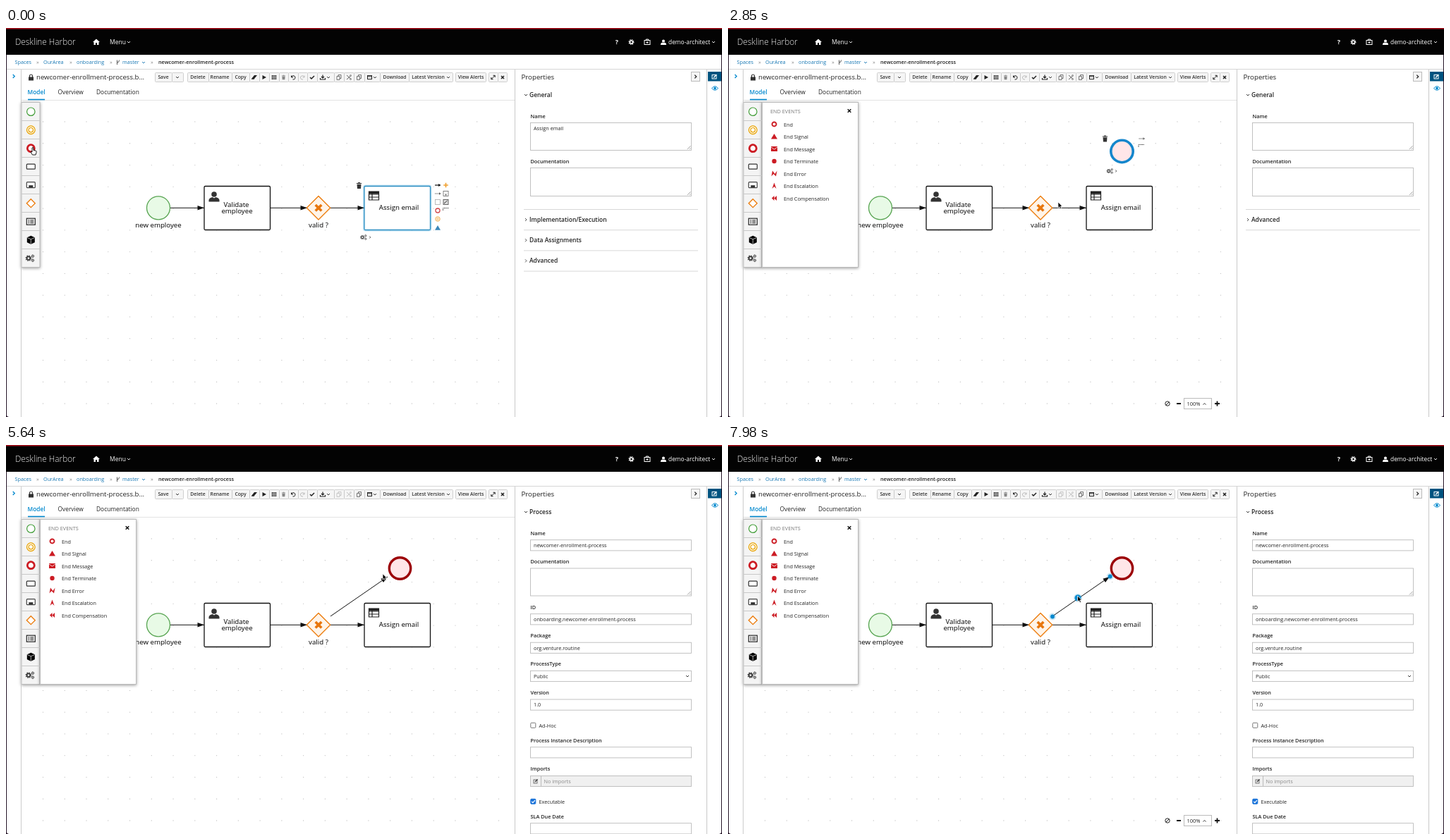
These frames come from a looping animation (1015x552 px, 8000 ms). An HTML page:

```html
<!DOCTYPE html>
<html lang="en">
<head>
<meta charset="utf-8">
<title>Process editor</title>
<style>
html, body { margin: 0; width: 100%; height: 100%; overflow: hidden; background: #fff; }
svg { display: block; width: 1015px; height: 552px; font-family: "Open Sans", "Noto Sans", sans-serif; }
text { white-space: pre; }
</style>
</head>
<body>
<svg id="stage" viewBox="0 0 1015 552"></svg>
<script>
const BLUE = '#0088ce', RED = '#cc1c24', ORANGE = '#ec7a08', INK = '#222', GREY = '#bbb';
const PROCESS = 'newcomer-enrollment-process';

// Drawing helpers; text is given by the middle of its capitals
const text = (x, y, s, size = 7.25, fill = INK, weight = 400, anchor = 'start') =>
  `<text x="${x}" y="${y + size * 0.36}" font-size="${size}" fill="${fill}" font-weight="${weight}" text-anchor="${anchor}">${s}</text>`;
const rect = (x, y, w, h, fill = 'none', stroke = 'none', more = '') =>
  `<rect x="${x}" y="${y}" width="${w}" height="${h}" fill="${fill}" stroke="${stroke}" ${more}/>`;
const path = (d, stroke = INK, width = 1, fill = 'none', more = '') =>
  `<path d="${d}" stroke="${stroke}" stroke-width="${width}" fill="${fill}" ${more}/>`;
const shape = (d, fill = INK) => path(d, 'none', 0, fill);
const circle = (x, y, r, fill = 'none', stroke = 'none', width = 1, more = '') =>
  `<circle cx="${x}" cy="${y}" r="${r}" fill="${fill}" stroke="${stroke}" stroke-width="${width}" ${more}/>`;
const at = (x, y, body, k = 1) => `<g transform="translate(${x} ${y}) scale(${k})">${body}</g>`;
const group = (id, body) => `<g id="${id}">${body}</g>`;
const down = (x, y, c = INK) => path(`M${x - 2} ${y - 1}l2 2l2-2`, c, 0.9);
const right = (x, y, c = INK, k = 2) => path(`M${x - k / 2} ${y - k}l${k} ${k}l${-k} ${k}`, c, k > 2 ? 1.3 : 0.8);

const gear = c => circle(0, 0, 2.1, 'none', c, 1.5) + circle(0, 0, 3.4, 'none', c, 1.2, 'stroke-dasharray="1.4 1.27"');
const gears = c => at(-2, 0, gear(c), 0.9) + at(3, -2.5, gear(c), 0.5) + at(3, 2.5, gear(c), 0.5);
const trash = (c = '#333') => shape('M-4-4H-1.5V-5H1.5V-4H4V-2.7H-4zM-3.3-2H3.3L2.8 5H-2.8z', c);
const person = (c = '#333') => circle(0, -3, 3.8, c) + shape('M-7.5 7.5V5Q-7 2-2.3 1L0 2.5L2.3 1Q7 2 7.5 5V7.5z', c);
const cross = (c, k, w) => path(`M${-k} ${-k}L${k} ${k}M${k} ${-k}L${-k} ${k}`, c, w);
const tableIcon = () => path('M-7-6H7V6H-7zM-7-2.2H7M-7 2H7M-2.5-6V6', '#222', 1.2) + rect(-7, -6, 14, 3, '#222');
const pencil = c => path('M-2.5 2.5L2.5-2.5', c, 2) + shape('M-4 4L-3.3 1.2L-1.2 3.3z', c);
const copyIcon = c => path('M-3-1.5H1V3.5H-3zM-1-1.5V-3.5H3V1.5H1', c, 0.8);

const tools = {
  flow: () => path('M-4 0H2', '#111', 1.2) + shape('M1-2L4.5 0L1 2z', '#111'),
  dots: () => path('M-4 0H2', '#555', 1, 'none', 'stroke-dasharray="1.3 .8"') + shape('M2-1.7L4.5 0L2 1.7z', '#555'),
  plus: () => path('M-3.3 0H3.3M0-3.3V3.3', '#f0a030', 1.7),
  box: () => rect(-3.5, -3.5, 7, 7, '#fff', '#aaa', 'stroke-width=".8"'),
  sub: () => rect(-3.5, -3.5, 7, 7, '#fff', '#666', 'stroke-width=".8"') + rect(-1, 0.5, 2, 2, '#666'),
  diag: () => rect(-3.5, -3.5, 7, 7, '#ddd', '#555', 'stroke-width=".9"') + path('M-2.5 2L2-2', '#333'),
  end: () => circle(0, 0, 3, '#fff', '#d04045', 1.3),
  mid: () => circle(0, 0, 3.2, '#fff', '#f0a030', 0.9) + circle(0, 0, 1.3, 'none', '#f0a030', 0.7),
  tri: () => shape('M-4 3.3L0-3.5L4 3.3z', '#3b87b8'),
  note: () => path('M-4 2V-1.5H4', '#555', 0.9, 'none', 'stroke-dasharray="2 .5"')
};
const toolbox = list => list.map(([k, x, y]) => at(x, y, tools[k]())).join('');

function header() {
  const links = [[12.5, 'Spaces'], [53, 'OurArea'], [100, 'onboarding'], [165, 'master']];
  return rect(0, 0, 1015, 38, '#030303') + rect(0, 0, 1015, 1.6, '#a3101c') +
    text(13, 20, 'Deskline Harbor', 11.8, '#eee', 300) +
    at(128, 20, shape('M-5 0L0-4.5L5 0H3.5V4H1V1H-1V4H-3.5V0z', '#fff')) +
    text(147, 20, 'Menu', 8.5, '#fff') + down(174, 20, '#fff') +
    text(866, 20, '?', 9, '#fff', 700, 'middle') + at(886.5, 20, gear('#fff')) +
    at(909, 20, rect(-4, -2.5, 8, 6, 'none', '#fff') + path('M-1.7-2.5V-4H1.7V-2.5M0-1V2M-1.5 .5H1.5', '#fff')) +
    at(932, 20, person('#fff'), 0.53) + text(939, 20, 'demo-architect', 8.4, '#fff') + down(1003, 20, '#fff') +
    links.map(([x, s]) => text(x, 48.5, s, 7.25, '#1878b4')).join('') +
    [43, 90, 147, 205].map(x => text(x, 48, '»', 7.5, '#888')).join('') +
    path('M157.5 45.5V52M160.5 45.5Q160.5 49 157.5 49', '#444', 0.9) + down(195, 49, '#1878b4') +
    text(216, 48.5, PROCESS, 7.25, INK, 600) + path('M0 58.5H1015', '#d6d6d6');
}

function toolbar() {
  const box = (x, w) => rect(x + 0.5, 63.5, w, 13, '#f5f5f5', '#c4c4c4', 'rx="1" stroke-width=".8"');
  const cells = [[211, 24], [235, 16], [257, 30], [287, 33], [320, 25], [345, 14], [359, 14], [373, 14], [387, 13],
    [400, 14], [414, 13], [427, 14], [441, 24], [465, 14], [479, 14], [493, 15], [508, 22], [530, 41], [571, 62], [637, 43], [684, 13], [697, 13]];
  const labels = [[223, 'Save'], [272, 'Delete'], [303, 'Rename'], [332.5, 'Copy'], [551, 'Download'], [598.5, 'Latest Version'], [659, 'View Alerts']];
  const cut = c => path('M-3-3L2.5 2M-3 3L2.5-2', c, 0.9) + circle(2.5, 2.5, 1, 'none', c, 0.7) + circle(2.5, -2.5, 1, 'none', c, 0.7);
  const undo = c => path('M-2.5-2.5V0H0M-2.3-.3A2.7 2.7 0 1 1-.5 3', c);
  return at(35.5, 70, rect(-3.5, -0.5, 7, 5, '#333') + path('M-2 0V-2A2 2 0 0 1 2-2V0', '#333', 1.2)) +
    text(43, 69.5, PROCESS + '.b...', 9.6) + cells.map(c => box(...c)).join('') +
    labels.map(([x, s]) => text(x, 70, s, 6.8, '#333', 600, 'middle')).join('') +
    down(243, 70) + down(457, 70) + down(523, 70) + down(627, 70) +
    at(352, 70, shape('M-4 2L0-3H4L0 2zM-4 3H0V2.3H-4z')) + at(366, 70, shape('M-2.5-3L3 0L-2.5 3z')) +
    at(380, 70, rect(-3.3, -3, 6.6, 6, '#333') + path('M-3.5-1H3.5M-3.5 1H3.5M-1-3V3M1.2-3V3', '#eee', 0.6)) +
    at(393.5, 70, trash('#888'), 0.65) + at(407, 70, undo(INK)) + at(420.5, 70, `<g transform="scale(-1 1)">${undo(GREY)}</g>`) +
    at(434, 70, path('M-3 0L-1 2L3-2', INK, 1.5)) +
    at(449, 70, path('M0-3.5V1M-2-1L0 1L2-1M-3.5 1V3H3.5V1', INK, 1.2)) +
    group('editOn', at(472, 70, copyIcon('#555')) + at(486, 70, cut('#555'))) +
    group('editOff', at(472, 70, copyIcon(GREY)) + at(486, 70, cut(GREY))) + at(500.5, 70, copyIcon('#555')) +
    at(515.5, 70, rect(-3, -2.5, 6, 5, '#fff', INK) + path('M-3-1H3', INK)) +
    at(690.5, 70, path('M-2.5 2.5L2.5-2.5M0-2.7H2.7V0M-2.7 0V2.7H0', INK, 1)) + at(704, 70, cross(INK, 2, 1.5)) +
    text(30.5, 91, 'Model', 8.3, BLUE, 600) + text(73.5, 91, 'Overview', 8.4) + text(128, 91, 'Documentation', 8.4) +
    path('M22 102.5H721', '#e4e4e4') + path('M31 101.5H55', BLUE, 1.6);
}

function arrow(x1, y1, x2, y2, color = '#111') {
  const a = Math.atan2(y2 - y1, x2 - x1) * 180 / Math.PI;
  return path(`M${x1} ${y1}L${x2} ${y2}`, color) +
    `<g transform="translate(${x2} ${y2}) rotate(${a})">${shape('M0 0L-9.5-3.2V3.2z', '#111')}</g>`;
}

function diagram() {
  let dots = '';
  for (let i = 0; i < 22; i++)
    for (let j = 0; j < 14; j++) dots += circle(52.5 + 30.76 * i, 133 + 30.77 * j, 0.65, '#c4c4c4');
  const task = (x, stroke, w) => rect(x, 224.5, 93.5, 62, '#fff', stroke, `stroke-width="${w}" rx="1.5"`);
  const gate = (stroke, fill) => path('M443 238.5L459.7 255.3L443 272L426.3 255.3z', stroke, 1.3, fill, 'stroke-linejoin="round"');
  return dots + arrow(233, 255.3, 281, 255.3) + arrow(375, 255.3, 427, 255.3) + arrow(460, 255.3, 508, 255.3) +
    circle(216, 255.3, 16.5, '#e8fae6', '#58a552', 1.3) + text(216, 279.3, 'new employee', 9.7, '#000', 400, 'middle') +
    task(281, '#111', 1.3) + at(295, 239, person()) +
    text(326.5, 250.3, 'Validate', 9.7, '#000', 400, 'middle') + text(327.5, 259.3, 'employee', 9.7, '#000', 400, 'middle') +
    group('gatePlain', gate(ORANGE, '#fff4e8')) +
    group('gateSel', path('M443 238.5L459.7 255.3L443 272L426.3 255.3z', BLUE, 4, 'none', 'opacity=".25"') + gate('#2a8abf', '#fff') +
      at(418.5, 237, trash(), 0.9) + at(425, 283, gears('#444'), 0.9) + rect(464, 231, 12.5, 12, '#fff', '#426', 'stroke-width=".9"') +
      toolbox([['flow', 470, 237], ['end', 482, 237], ['plus', 494, 237], ['note', 507, 236], ['dots', 470, 249], ['mid', 482, 249],
        ['sub', 494, 249], ['box', 470, 261], ['tri', 482, 261], ['diag', 494, 261]])) +
    at(443, 255.3, cross('#e8770d', 4.3, 3.6)) + text(443, 279.3, 'valid ?', 9.7, '#000', 400, 'middle') +
    group('taskPlain', task(508, '#111', 1.3)) +
    group('taskSel', rect(508, 224.5, 93.5, 62, 'none', BLUE, 'stroke-width="4" rx="2" opacity=".25"') + task(508, '#2d8fc2', 1.3) +
      at(500.5, 223.5, trash(), 0.9) + at(507, 297, gears('#444'), 0.9) + right(516, 297, INK, 1.5) +
      toolbox([['flow', 612, 223], ['plus', 623.5, 223], ['dots', 612, 235], ['sub', 623.5, 235], ['box', 612, 247], ['diag', 623.5, 247],
        ['end', 612, 259], ['note', 623.5, 257], ['mid', 612, 271], ['tri', 612, 283.5]])) +
    at(521.5, 238, tableIcon()) + text(557, 255, 'Assign email', 9.7, '#000', 400, 'middle') +
    group('endSel', circle(558.5, 175, 15.7, '#ffe6e8', '#1486cc', 3.6)) +
    group('endTools', at(534.5, 157, trash(), 0.9) + at(541.5, 203, gears('#444'), 0.9) + right(550, 203, INK, 1.5) +
      toolbox([['dots', 586.5, 157], ['note', 586, 167]])) +
    group('endPlain', circle(558.5, 175, 15.2, '#ffe6e8', '#9c0006', 3.4)) +
    group('magnets', circle(558.5, 175, 15.7, 'none', '#2f66cf', 3.6) +
      [[558.5, 158], [575.5, 175], [558.5, 192], [541.5, 175], [558.5, 175]].map(p => circle(...p, 4, '#1c86cb')).join('')) +
    group('flowBlack', arrow(460, 243, 541, 187)) +
    group('flowBlue', path('M460 243L541 187', BLUE, 4, 'none', 'opacity=".2"') + arrow(460, 243, 541, 187, '#1c86cb')) +
    group('handles', [[460, 243.5], [541.7, 186.5]].map(p => circle(...p, 5, BLUE, 'none', 1, 'opacity=".2"') + circle(...p, 2.9, BLUE)).join('')) +
    group('midOpen', circle(497, 217.7, 3.8, '#fff', BLUE, 1.5)) +
    group('midFull', circle(496, 217, 6, BLUE, 'none', 1, 'opacity=".2"') + circle(496, 217, 4.5, BLUE)) +
    group('drag', '<path id="dragLine" stroke="#1c86cb" fill="none"/>' + circle(460, 241.5, 3.6, '#b0102c') +
      `<g id="dragRing">${circle(0, 0, 12, 'none', '#000', 2)}</g>`) +
    group('zoom', circle(623, 533, 3.2, 'none', '#222', 1) + path('M621 535L625 531') + path('M636 533H642M690 533H697M693.5 529.5V536.5', '#111', 1.8) +
      rect(646.5, 525.5, 39, 15, '#fff', '#bbb') + text(650.5, 533.5, '100%', 7.5) + path('M673.5 534.5l2-2l2 2', INK, 0.9)) +
    group('newEnd', circle(0, 0, 7.5, '#fde', 'none') + circle(0, 0, 5.2, '#fff', '#cf2026', 3.3));
}

function palette() {
  const icons = [
    circle(0, 0, 5.7, '#fff', '#3f9c35', 1.2),
    circle(0, 0, 5.8, '#fff', '#e8a200', 1.3) + circle(0, 0, 3.2, 'none', '#e8a200', 1.2),
    circle(0, 0, 5, '#fff', RED, 2.8),
    rect(-6, -3.5, 12, 7, '#fff', '#333', 'rx="1" stroke-width="1.2"'),
    rect(-6, -4, 12, 8, '#fff', '#444', 'rx="1" stroke-width="1.2"') + rect(-3, 0.5, 6, 3, '#333'),
    path('M0-6L6 0L0 6L-6 0z', ORANGE, 1.3, '#fff'),
    rect(-6, -4.5, 12, 9, '#fff', '#222', 'stroke-width="1.2"') + path('M-4-2H-2M-1-2H4M-4 0H-2M-1 0H4M-4 2H-2M-1 2H4', '#222', 1.1),
    shape('M0-6L5.5-3.5V3.5L0 6L-5.5 3.5V-3.5z', '#000') + path('M-5-3L0-1L5-3M0-1V5.5', '#fff', 0.7),
    at(-1, 0, gears('#333'), 1.2)
  ];
  const events = [
    ['End', circle(0, 0, 3, '#fff', RED, 1.9)], ['End Signal', shape('M-4.5 3.5L0-4L4.5 3.5z', RED)],
    ['End Message', rect(-4.5, -3.5, 9, 7, RED) + path('M-4.5-2.5L0 .7L4.5-2.5', '#fff', 0.8)],
    ['End Terminate', circle(0, 0, 3.2, RED)], ['End Error', shape('M-4 4L-2.5-4L1 .5L4-4L2.5 4L-1 .5z', RED)],
    ['End Escalation', shape('M0-4.5L3 4L0 1L-3 4z', RED)], ['End Compensation', shape('M0-3.5V3.5L-3.5 0zM3.5-3.5V3.5L0 0z', RED)]
  ];
  const shadow = 'filter="drop-shadow(0 1px 2px #0006)"';
  return rect(22, 105.5, 26, 234, '#f4f4f4', '#bbb', shadow) +
    group('drawer', rect(48.5, 105.5, 136, 234, '#fff', '#bbb', shadow) + text(60, 118.5, 'END EVENTS', 7.3, '#777') +
      at(172, 117.5, cross('#111', 2.3, 1.5)) +
      events.map(([s, icon], i) => at(65.5, 136.5 + 17.5 * i, icon) + text(79, 137 + 17.5 * i, s)).join('')) +
    icons.map((icon, i) => (i ? path(`M22 ${105.5 + 26 * i}H48`, '#c8c8c8') : '') + at(35.3, 118.7 + 26 * i, icon)).join('');
}

function field(y, h, value = '', fill = '#fff') {
  const grip = h > 20 ? path(`M966 ${y + h - 1}l4.5-4.5M969 ${y + h - 1}l1.5-1.5`, '#777', 0.7) : '';
  return rect(743.5, y + 0.5, 228, h, fill, '#bbb', 'stroke-width=".9"') + text(748, y + 8.3, value) + grip;
}
const label = (y, s) => text(743.5, y, s, 7.3, INK, 600);
const heading = (y, s, open) => (open ? down(737, y) : right(737, y)) + text(742, y, s, 8.5, INK, 600);

function form(name, sections) {
  return heading(95, 'General', true) + label(125, 'Name') + field(134, 39, name) +
    label(189.5, 'Documentation') + field(198, 40) + path('M734 257.5H981', '#d8d8d8') +
    sections.map((s, i) => heading(272 + 29.2 * i, s) + path(`M734 ${286.7 + 29.2 * i}H981`, '#d8d8d8')).join('');
}

function processForm() {
  const rows = [['Name', 125, PROCESS], ['ID', 230, 'onboarding.' + PROCESS], ['Package', 270.5, 'org.venture.routine'],
    ['ProcessType', 310.7, 'Public'], ['Version', 351.3, '1.0'], ['Process Instance Description', 419, ''], ['SLA Due Date', 527, '']];
  const check = (y, s, on) => rect(743.8, y - 3.7, 7, 7, on ? '#1a73d9' : '#fff', on ? '#1a73d9' : '#777', 'rx="1"') +
    (on ? path(`M745.2 ${y}l1.7 1.7l3-3.5`, '#fff', 1.2) : '') + text(755.5, y, s);
  return heading(95, 'Process', true) + rows.map(([s, y, v]) => label(y, s) + field(y + 9.2, 15.2, v)).join('') +
    label(165.5, 'Documentation') + field(174.5, 39) + down(966, 328) + check(398, 'Ad-Hoc') + label(459.5, 'Imports') +
    field(469, 15, '', '#f0f0f0') + path('M758.5 469.5V484', '#bbb') + text(762.5, 477, 'No imports', 7.25, '#888') +
    at(751, 477, rect(-3, -2, 5, 5, 'none', '#555', 'stroke-width=".8"') + at(1, -1, pencil('#333'), 0.6)) + check(506, 'Executable', true);
}

function sidebar() {
  return rect(721, 59, 294, 493, '#fff') + path('M721.5 59V552M993.5 59V552', '#c9c9c9') + text(730.5, 69.5, 'Properties', 9.7) +
    rect(971.5, 62.5, 12, 13, '#f5f5f5', '#bbb') + right(977.5, 69, INK, 2.4) +
    rect(995, 62, 19, 13.5, '#00537f') + at(1004.5, 69, rect(-3.5, -2.5, 6, 5.5, 'none', '#fff') + at(1, -1, pencil('#fff'), 0.7)) +
    at(1005, 85.5, path('M-4.5 0Q0-5.5 4.5 0Q0 5.5-4.5 0z', BLUE) + circle(0, 0, 1.8, BLUE)) +
    group('p_task', form('Assign email', ['Implementation/Execution', 'Data Assignments', 'Advanced'])) +
    group('p_end', form('', ['Advanced'])) + group('p_gate', form('valid ?', ['Implementation/Execution', 'Advanced'])) +
    group('p_flow', form('', ['Implementation/Execution'])) + group('p_process', processForm());
}

const stage = document.getElementById('stage');
stage.innerHTML = rect(0, 0, 1015, 552, '#fff') + diagram() + sidebar() + palette() + header() + toolbar() +
  path('M21.5 59V552', '#ccc') + right(11, 68.5, BLUE, 2.5) +
  path('M.5 38V552M1014.5 38V552', '#251528') + shape('M0 548V552H4Q1 551 0 548M1015 548V552H1011Q1014 551 1015 548', '#251528') +
  group('arrowCursor', path('M0 0V8.5L2 6.7L3.5 9.8L5 9L3.6 6H6z', '#fff', 0.8, '#000')) +
  group('handCursor', path('M-1-1Q0-2 1-1V2.5L4.5 3.2Q5.5 4 5 5.5L4 9H-.5L-3 5Q-3 3.7-1 5z', '#000', 0.9, '#fff'));

// Cursor path: time, x, y, and 1 for a steady run up to that point
const moves = [[0, 36, 171], [250, 36, 171], [780, 97, 131.5], [840, 97, 131.5], [1200, 268, 147, 1], [1850, 590, 169.5, 1],
  [2490, 590, 169.5], [2850, 468, 247, 1], [3220, 443, 254, 1], [3500, 443, 254], [4030, 470, 237], [4110, 470, 237],
  [4800, 545.5, 174], [5490, 545.5, 174], [6000, 491, 215], [6300, 491, 215], [6600, 496.5, 216], [6750, 496.5, 216],
  [7150, 460, 187], [7300, 460, 187], [7700, 495.5, 214], [8000, 495.5, 214]];
const panels = [[0, 'task'], [2500, 'end'], [3300, 'gate'], [5550, 'process'], [5980, 'end'], [6450, 'process'], [6850, 'flow'], [7600, 'process']];

function cursorAt(t) {
  const i = moves.findIndex(m => m[0] > t), a = moves[i - 1], b = moves[i];
  let u = (t - a[0]) / (b[0] - a[0]);
  if (!b[3]) u = u * u * (3 - 2 * u);
  return [a[1] + (b[1] - a[1]) * u, a[2] + (b[2] - a[2]) * u];
}

const el = id => document.getElementById(id);
const show = (id, on) => { el(id).style.display = on ? '' : 'none'; };
const place = (id, x, y) => el(id).setAttribute('transform', `translate(${x} ${y})`);

function draw(t) {
  const [x, y] = cursorAt(t), within = (a, b) => t >= a && t < b;
  const panel = panels.filter(p => p[0] <= t).pop()[1];
  for (const p of ['task', 'end', 'gate', 'flow', 'process']) show('p_' + p, p === panel);
  const idle = panel === 'process', gateSel = within(3300, 5150), dragging = within(4110, 4920);
  const flowSel = t >= 5980 && !idle;
  show('editOn', !idle); show('editOff', idle);
  show('drawer', t >= 250);
  show('taskSel', t < 1950); show('taskPlain', t >= 1950);
  show('gateSel', gateSel); show('gatePlain', !gateSel);
  show('newEnd', within(840, 1950)); place('newEnd', x - 32, y + 5.5);
  show('endSel', within(1950, 3300)); show('endTools', within(1950, 3300)); show('endPlain', t >= 3300);
  show('drag', dragging); show('magnets', within(4110, 5150) && x > 505);
  place('dragRing', x, y);
  el('dragLine').setAttribute('d', `M460 241.5L${x - 4} ${y + 3}`);
  show('flowBlack', t >= 4920 && !flowSel); show('flowBlue', flowSel);
  show('handles', t >= 5980); show('midOpen', within(5980, 6600)); show('midFull', t >= 6600);
  show('zoom', within(1600, 5500) || t >= 6600);
  const hand = t < 840;
  show('handCursor', hand); show('arrowCursor', !hand);
  place(hand ? 'handCursor' : 'arrowCursor', x + (hand ? 2 : 0), y);
}

const start = performance.now();
function tick() {
  draw((performance.now() - start) % 8000);
  requestAnimationFrame(tick);
}
tick();
</script>
</body>
</html>
```
